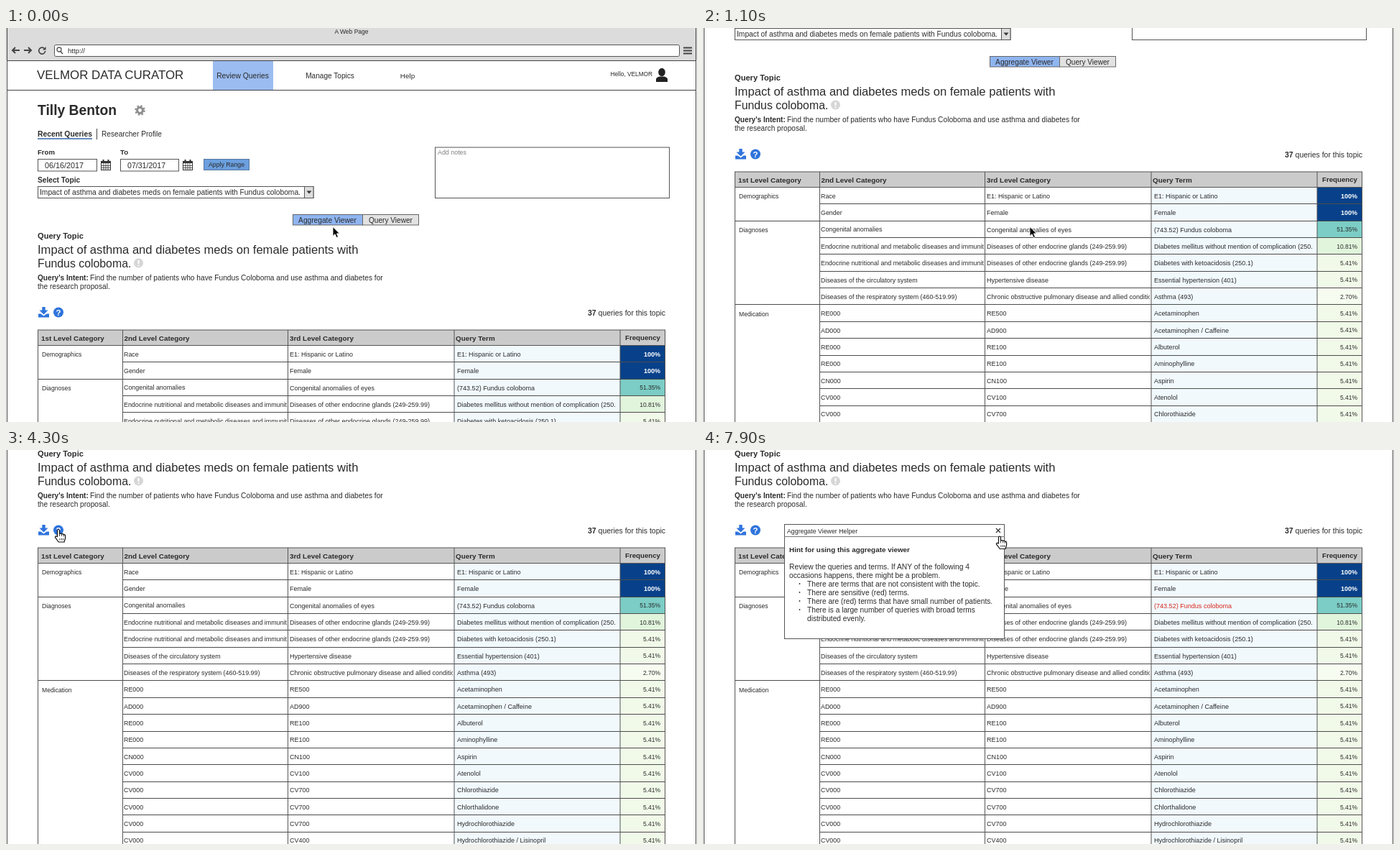
These frames come from a looping animation (962 px wide and 548 px high, 8000 ms). An HTML page:

```html
<!DOCTYPE html>
<html lang="en">
<head>
<meta charset="utf-8">
<title>Aggregate viewer</title>
<style>
  html, body { margin: 0; width: 100%; height: 100%; overflow: hidden; background: #fff; }
  svg { display: block; }
  #stage { font-family: "Liberation Sans", Arial, sans-serif; }
</style>
</head>
<body>
<svg id="stage" width="962" height="548" viewBox="0 0 962 548">
  <g id="page"></g>
  <path d="M1.5 0V548M960.5 0V548" stroke="#444"/>
  <g id="popup"></g>
  <g id="cursor">
    <path id="arrow" d="M0 0V13L3 10.2L5.2 15L7.5 14L5.4 9.4H9.4Z" stroke="#fff" stroke-width=".9"/>
    <g id="hand" stroke="#111" stroke-width="1.2" stroke-linejoin="round" fill="#fff">
      <path d="M-1.5 10V1.5Q-1.3 0 0 0T1.5 1.5V6Q3.5 4.8 4.6 6.5Q6.4 5.6 7.3 7.3Q9.6 6.8 9.6 9.2V12L8 17.5H.2L-4.6 10.8Q-4.4 8.3-1.5 10Z"/>
      <path d="M1.5 6V9.5M4.6 6.5V9.5M7.3 7.3V10M2 12.2V15M4.4 12.2V15M6.6 12.2V15" stroke-width=".8"/>
    </g>
  </g>
</svg>
<script>
const $ = id => document.getElementById(id);
const INK = '#2b2b2b', BLUE = '#2f74dc';

// Text is placed by the middle of its capitals.
const text = (x, y, size, str, attrs = '') =>
  `<text x="${x}" y="${(y + size * .36).toFixed(2)}" font-size="${size}" fill="${INK}" ${attrs}>${str}</text>`;
const bold = (x, y, size, str, attrs = '') => text(x, y, size, str, 'font-weight="700" ' + attrs);
const rect = (x, y, w, h, fill, stroke = 'none', attrs = '') =>
  `<rect x="${x}" y="${y}" width="${w}" height="${h}" fill="${fill}" stroke="${stroke}" ${attrs}/>`;
const path = (d, stroke = '#444', width = 1, fill = 'none') =>
  `<path d="${d}" stroke="${stroke}" stroke-width="${width}" fill="${fill}"/>`;
const disc = (x, y, r, fill) => `<circle cx="${x}" cy="${y}" r="${r}" fill="${fill}"/>`;
const MID = 'text-anchor="middle"', END = 'text-anchor="end"';

function browser() {
  return rect(0, 0, 962, 45, '#dcdcdc') +
    path('M1 45.5H961M1 86.5H961') +
    text(481, 5, 8.5, 'A Web Page', MID) +
    rect(67.5, 23.5, 870, 16, '#fff', '#555', 'rx="2"') +
    path('M19 31H10M13 27L9 31L13 35M25 31H34M31 27L35 31L31 35', '#444', 2) +
    path('M53.5 28.5A4.5 4.5 0 1 0 54.7 32', '#444', 1.7) +
    path('M55.5 26V30.5H51Z', 'none', 0, '#444') +
    `<circle cx="74" cy="30" r="3" fill="none" stroke="#555" stroke-width="1.3"/>` +
    path('M76 32.5L79 36', '#555', 1.6) +
    text(86, 31.5, 9.6, 'http://') +
    path('M943 27.5H955M943 31.5H955M943 35.5H955', '#444', 2);
}

function header() {
  return rect(288, 45, 84, 41, '#9bbcf0') +
    path('M288 45.5H372M288 86.5H372') +
    text(43, 65, 16.9, 'VELMOR DATA CURATOR') +
    text(329.5, 66, 10.3, 'Review Queries', MID) +
    text(451, 66, 10.1, 'Manage Topics', MID) +
    text(559, 66, 9.9, 'Help', MID) +
    text(900, 64.5, 8.3, 'Hello, VELMOR', END) +
    `<ellipse cx="913" cy="61.5" rx="4.8" ry="5.8" fill="#222"/>` +
    path('M905 75V71Q905.5 68.5 910 67.5H916Q920.5 68.5 921 71V75Z', 'none', 0, '#222');
}

const calendar = x =>
  rect(x + .5, 185.5, 13, 12, '#fff', '#333') + rect(x, 185, 14, 3, '#333') +
  path(`M${x + 3.5} 183V187M${x + 10.5} 183V187`, '#333', 2) +
  path(`M${x} 191.5H${x + 14}M${x} 194.5H${x + 14}M${x + 4} 188V198M${x + 7} 188V198M${x + 10} 188V198`, '#333', .8);

function form() {
  return bold(44, 114, 19.3, 'Tilly Benton') +
    `<circle cx="186.5" cy="114.5" r="6" fill="none" stroke="#8e8e8e" stroke-width="2.6" stroke-dasharray="2.4 2.312"/>
     <circle cx="186.5" cy="114.5" r="3.9" fill="none" stroke="#8e8e8e" stroke-width="3"/>` +
    bold(44, 147.5, 10.35, 'Recent Queries') + path('M44 154H120', '#3467a8', 1.6) +
    path('M126.5 140V155') + text(133, 147.5, 10.15, 'Researcher Profile') +
    bold(44, 173, 9.6, 'From') + bold(159, 173, 9.7, 'To') +
    rect(44.5, 182.5, 82, 16.5, '#fff', '#555') + text(54, 191, 10.8, '06/16/2017') + calendar(132) +
    rect(159.5, 182.5, 81, 16.5, '#fff', '#555') + text(169, 191, 10.6, '07/31/2017') + calendar(246) +
    rect(275.5, 182.5, 63, 15, '#6b9fde', '#56789f') + text(307, 190, 8.75, 'Apply Range', MID) +
    bold(44, 211, 10.2, 'Select Topic') +
    rect(44.5, 220.5, 383.5, 16, '#fff', '#555') +
    text(47, 228.5, 10.25, 'Impact of asthma and diabetes meds on female patients with Fundus coloboma.') +
    rect(415.5, 220.5, 12.5, 16, '#ddd', '#555') + path('M418.5 226.5H425.5L422 230.5Z', 'none', 0, '#333') +
    rect(597.5, 166, 326, 70.5, '#fff', '#555') +
    `<g opacity=".6">${text(601, 173, 8.9, 'Add notes')}</g>` +
    rect(399.5, 259.5, 97, 14.5, '#8fb5f0', '#666') + text(447.5, 267, 10.2, 'Aggregate Viewer', MID) +
    rect(496.5, 259.5, 78, 14.5, '#e2e2e2', '#666') + text(535.5, 267, 10.1, 'Query Viewer', MID);
}

function topic() {
  return bold(44, 289, 11.1, 'Query Topic') +
    text(44, 308, 16.6, 'Impact of asthma and diabetes meds on female patients with') +
    text(44, 327.5, 15.85, 'Fundus coloboma.') +
    disc(184.5, 327, 6.5, '#d6d6d6') + path('M184.5 323V328M184.5 329.5V331.3', '#fff', 2) +
    bold(44, 347.5, 10.1, "Query's Intent:") +
    text(117, 347.5, 10.2, 'Find the number of patients who have Fundus Coloboma and use asthma and diabetes for') +
    text(44, 359.5, 10.15, 'the research proposal.') +
    path('M50.3 388H54.7V392.5H58.5L52.5 398.5L46.5 392.5H50.3Z', 'none', 0, BLUE) +
    path('M45 397.5H48.5L52.5 400.5L56.5 397.5H60V402.5H45Z', 'none', 0, BLUE) +
    disc(73, 395.5, 7, BLUE) + bold(73, 395.5, 11.5, '?', MID + ' style="fill:#fff"') +
    text(918, 396.5, 10.45, '<tspan font-weight="700">37</tspan> queries for this topic', END);
}

const ENDOCRINE = 'Endocrine nutritional and metabolic diseases and immunity disorders|Diseases of other endocrine glands (249-259.99)|';
const rows = [
  'Race|E1: Hispanic or Latino|E1: Hispanic or Latino|100',
  'Gender|Female|Female|100',
  'Congenital anomalies|Congenital anomalies of eyes|(743.52) Fundus coloboma|51.35',
  ENDOCRINE + 'Diabetes mellitus without mention of complication (250.00)|10.81',
  ENDOCRINE + 'Diabetes with ketoacidosis (250.1)',
  'Diseases of the circulatory system|Hypertensive disease|Essential hypertension (401)',
  'Diseases of the respiratory system (460-519.99)|Chronic obstructive pulmonary disease and allied conditions|Asthma (493)|2.70',
  'RE000|RE500|Acetaminophen',
  'AD000|AD900|Acetaminophen / Caffeine',
  'RE000|RE100|Albuterol',
  'RE000|RE100|Aminophylline',
  'CN000|CN100|Aspirin',
  'CV000|CV100|Atenolol',
  'CV000|CV700|Chlorothiazide',
  'CV000|CV700|Chlorthalidone',
  'CV000|CV700|Hydrochlorothiazide',
  'CV000|CV400|Hydrochlorothiazide / Lisinopril'
].map(r => r.split('|'));
const groups = { 0: 'Demographics', 2: 'Diagnoses', 7: 'Medication' };
const heat = { '100': '#08418a', '51.35': '#7bcdc5', '10.81': '#e1f4dc', '5.41': '#f1fae9', '2.70': '#f7fcf0' };

const PITCH = 23.35, TOP = 441;
const rowTop = i => Math.round(TOP + PITCH * i) + .5;

// A nested svg cuts long text at the cell's edge.
const cell = (x, right, y, size, str, attrs) =>
  `<svg x="${x}" y="${y - 9}" width="${right - x}" height="18">${text(0, 9, size, str, attrs)}</svg>`;

function table() {
  const bottom = rowTop(rows.length);
  let out = rect(624, 441, 231, bottom - 441, '#f1f9fd');
  rows.forEach(([second, third, term, freq = '5.41'], i) => {
    const y = TOP + 12.6 + PITCH * i, top = rowTop(i), full = freq === '100';
    out += rect(855, top, 63, rowTop(i + 1) - top, heat[freq]);
    out += path(`M${groups[i] ? 44 : 162} ${top}H918`, '#4c4c4c');
    if (groups[i]) out += text(50, y + .5, 8.6, groups[i]);
    out += cell(164, 391, y, 8.9, second) + cell(395, 622, y, 9, third) +
      cell(628, 849, y, 9.05, term, i === 2 ? 'id="flagged"' : '') +
      (full ? bold : text)(911, y, full ? 9 : 8.5, freq + '%', END + (full ? ' style="fill:#fff"' : ''));
  });
  out += rect(44.5, 420, 873, 21.5, '#cbcbcb', '#555');
  ['1st', '2nd', '3rd'].forEach((n, i) => out += bold([49, 164.5, 395][i], 431, 9.9, n + ' Level Category'));
  out += bold(626, 431, 9.9, 'Query Term') + bold(911, 431, 9.7, 'Frequency', END);
  return out + [44.5, 162.5, 392.5, 624, 855, 917.5].map(x => path(`M${x} 420V${bottom}`, '#555')).join('');
}

function popup() {
  const lines = [
    'There are terms that are not consistent with the topic.',
    'There are sensitive (red) terms.',
    'There are (red) terms that have small number of patients.',
    'There is a large number of queries with broad terms',
    'distributed evenly.'
  ];
  return rect(113.5, 103.5, 306, 159, '#fff', '#555') + path('M113 120.5H420', '#777') +
    text(117, 112.5, 8.8, 'Aggregate Viewer Helper') +
    path('M408 109L414 115M414 109L408 115', '#333', 1.3) +
    bold(120, 138, 9.9, 'Hint for using this aggregate viewer') +
    text(120, 162, 10.3, 'Review the queries and terms. If ANY of the following 4') +
    text(120, 174, 10.25, 'occasions happens, there might be a problem.') +
    lines.map((line, i) => text(145, 186 + 12 * i, 10.2, line) + (i < 4 ? disc(134.5, 186 + 12 * i, .9, INK) : '')).join('');
}

$('page').innerHTML = browser() + header() + form() + topic() + table();
$('popup').innerHTML = popup();

// Keys are [time, value]; values between keys are linear.
function track(keys, t) {
  const i = keys.findIndex(k => k[0] > t);
  if (i < 0) return keys[keys.length - 1][1];
  if (i === 0) return keys[0][1];
  const [t0, a] = keys[i - 1], [t1, b] = keys[i];
  return a + (b - a) * (t - t0) / (t1 - t0);
}
const ease = p => p * p * (3 - 2 * p);

const scroll = [[0, 0], [100, 24], [200, 80], [300, 140], [400, 184], [600, 211], [800, 220],
  [1100, 220], [1300, 244], [1500, 272], [1700, 284]];
const toHelp = [[1800, 0], [2500, 1]];
const toClose = [[6900, 0], [7600, 1]];

function draw(now) {
  const t = Math.floor(now % 8000 / 100) * 100;
  const a = ease(track(toHelp, t)), b = ease(track(toClose, t));
  const open = t >= 5300;
  const hand = (t >= 3200 && !open) || t >= 7600;
  $('page').setAttribute('transform', `translate(0 ${-track(scroll, t)})`);
  $('cursor').setAttribute('transform', `translate(${455 - 382 * a + 340 * b} ${276.5 - 166 * a + 9.5 * b})`);
  $('popup').style.display = open ? '' : 'none';
  $('flagged').style.fill = open ? '#d8281e' : INK;
  $('arrow').style.display = hand ? 'none' : '';
  $('hand').style.display = hand ? '' : 'none';
  requestAnimationFrame(() => draw(performance.now()));
}
draw(0);
</script>
</body>
</html>
```
